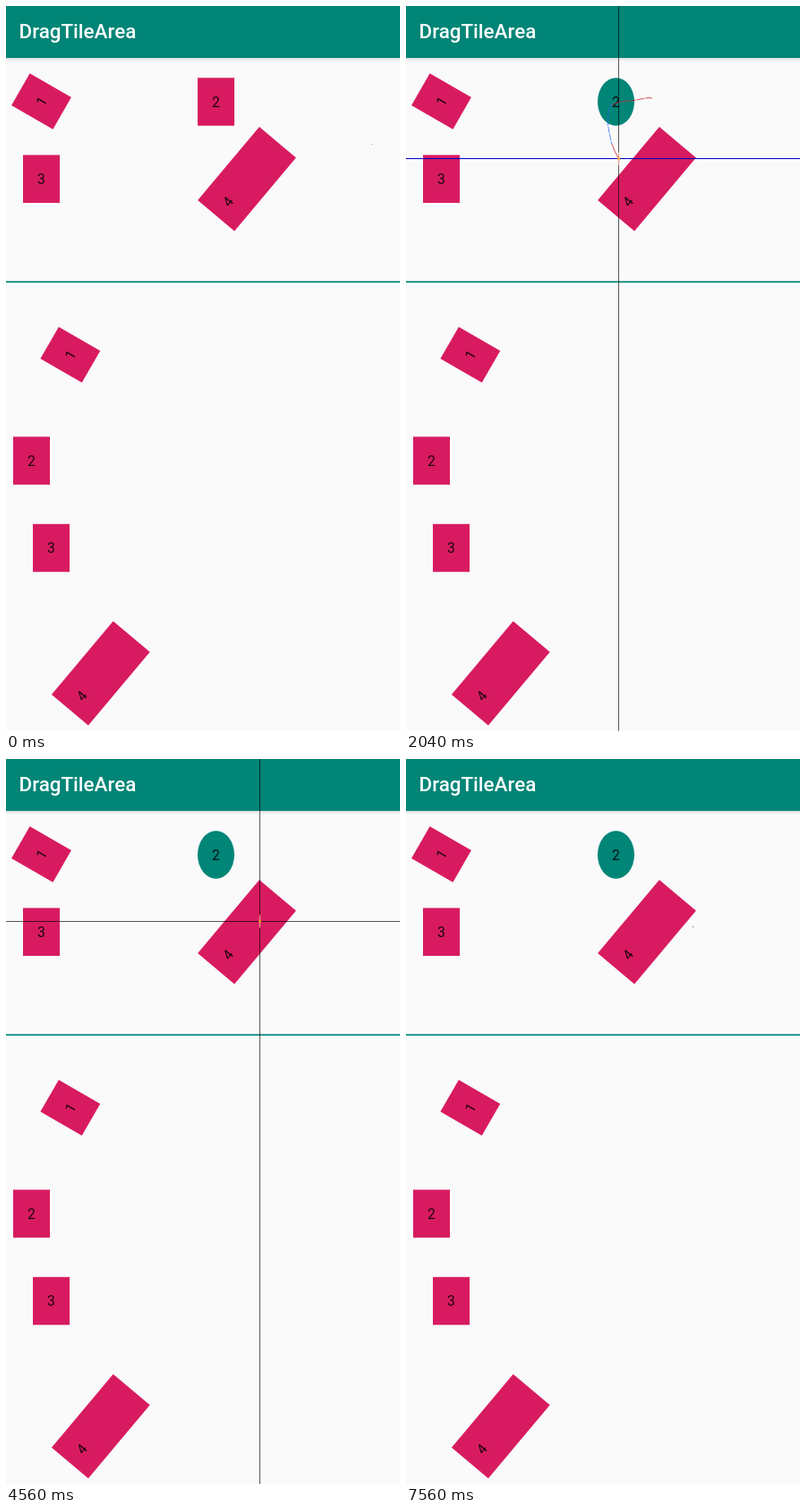
Recreate the animation shown at these times as an HTML page. Size 440 px wide and 810 px high, loop 8 s.

```html
<!DOCTYPE html>
<html lang="en">
<head>
<meta charset="utf-8">
<title>DragTileArea</title>
<style>
  html, body { margin: 0; width: 100%; height: 100%; overflow: hidden; background: #fafafa; }
  svg { display: block; width: 440px; height: 810px; }
  text { font-family: Roboto, sans-serif; }
  .title { font-size: 22.4px; font-weight: 500; fill: #fff; }
  .digit { font-size: 15.7px; text-anchor: middle; fill: rgba(0, 0, 0, .87); }
  .tile { fill: #d81b60; }
  .picked { fill: #008577; }
  .trail { fill: none; stroke-width: .8; }
</style>
</head>
<body>
<svg viewBox="0 0 440 810">
  <defs>
    <linearGradient id="shade" x2="0" y2="1">
      <stop stop-color="#000" stop-opacity=".12"/>
      <stop offset="1" stop-color="#000" stop-opacity="0"/>
    </linearGradient>
  </defs>
  <rect width="440" height="810" fill="#fafafa"/>
  <rect y="58" width="440" height="4" fill="url(#shade)"/>
  <rect width="440" height="58" fill="#008577"/>
  <text class="title" x="14.5" y="36">DragTileArea</text>
  <rect y="307.4" width="440" height="1.7" fill="#008577"/>
  <g id="tiles"></g>
  <g id="trails"></g>
  <g id="marks"></g>
  <g id="cross">
    <path id="across" d="M0 0H440"/>
    <path id="down" d="M0 0V810" stroke="#000" stroke-opacity=".65"/>
    <g id="touch">
      <ellipse rx=".8" ry="8" fill="#ffb0a0" fill-opacity=".8"/>
      <circle r="1.3" fill="#ffa000"/>
    </g>
  </g>
</svg>
<script>
const LOOP = 8000, STEP = 60, HEIGHT = 53.5;
const $ = id => document.getElementById(id);

function add(parent, tag, attrs) {
  const node = document.createElementNS("http://www.w3.org/2000/svg", tag);
  for (const key in attrs) node.setAttribute(key, attrs[key]);
  return parent.appendChild(node);
}
const show = (node, on) => node.setAttribute("visibility", on ? "visible" : "hidden");

// Labels sit one fixed inset from the left edge, before rotation.
function makeTile(label, x, y, angle = 0, width = 41) {
  const g = add($("tiles"), "g", { transform: `translate(${x} ${y}) rotate(${angle})` });
  const rect = add(g, "rect", { class: "tile", x: -width / 2, y: -HEIGHT / 2, width, height: HEIGHT });
  const oval = add(g, "ellipse", { class: "picked", rx: width / 2, ry: HEIGHT / 2 });
  add(g, "text", { class: "digit", x: 20.5 - width / 2, y: 5.6 }).textContent = label;
  const pick = on => { show(rect, !on); show(oval, on); };
  pick(false);
  return pick;
}

makeTile(1, 39.5, 106.5, -60);
const pickTwo = makeTile(2, 234.5, 107);
makeTile(3, 39.5, 193.2);
const pickFour = makeTile(4, 269, 193.2, -50, 107);
makeTile(1, 71.8, 389.7, -60);
makeTile(2, 28.5, 508);
makeTile(3, 50.5, 605.5);
makeTile(4, 105.8, 745.5, -50, 107);

const drag = { start: 1140, end: 2640, clear: 4560 };
const path = [
  [275, 103], [271, 102.5], [262, 104], [254, 105.5], [246, 106], [237, 107.5],
  [229.5, 110.5], [229.5, 110.5], [226.5, 117], [225.5, 123], [225.3, 130],
  [226.3, 138], [228, 146], [229.8, 154], [233.5, 163], [237.5, 170.5],
  [241, 175.5], [245, 181], [249, 185], [253, 189], [257, 191.5], [262, 194], [267.5, 196.5]
];
const taps = [
  { start: 4560, end: 4620, x: 283.5, y: 181.5 },
  { start: 5340, end: 5460, x: 233.5, y: 165.5 },
  { start: 6180, end: 6300, x: 246.5, y: 159.5 },
  { start: 6660, end: 6720, x: 291.5, y: 222.5, streak: 13 },
  { start: 7020, end: 7080, x: 308.5, y: 208.5 },
  { start: 7440, end: 7560, x: 320.5, y: 187.5 }
];

const segments = path.slice(1).map(([x, y], i) => add($("trails"), "path", {
  class: "trail",
  d: `M${path[i]}L${x} ${y}`,
  stroke: i > 6 && i < 13 ? "#2a6cf0" : "#d02030",
  "stroke-dasharray": i > 12 ? "none" : "4 1"
}));

const firstDot = add($("marks"), "rect", { x: 408, y: 154, width: 1, height: 1, fill: "#f08090" });
for (const tap of taps) {
  tap.mark = add($("marks"), "g", { transform: `translate(${tap.x} ${tap.y})` });
  if (tap.streak) {
    add(tap.mark, "path", { d: `M${-tap.streak / 2} 0h${tap.streak}`, stroke: "#e040a0", "stroke-width": .8 });
  }
  add(tap.mark, "rect", { x: -.5, y: -.5, width: 1, height: 1, fill: tap.streak ? "#c01060" : "#555" });
}

function setCross(point, blue) {
  show($("cross"), !!point);
  if (!point) return;
  const [x, y] = point;
  $("down").setAttribute("transform", `translate(${Math.floor(x) + .5} 0)`);
  $("across").setAttribute("transform", `translate(0 ${Math.floor(y) + .5})`);
  $("across").setAttribute("stroke", blue ? "#0000c0" : "rgba(0,0,0,.65)");
  $("touch").setAttribute("transform", `translate(${x} ${y})`);
}

function draw(t) {
  const index = Math.min(path.length - 1, Math.floor((t - drag.start) / STEP));
  const dragging = t >= drag.start && t < drag.end;
  const tap = taps.find(p => t >= p.start && t < p.end);
  const last = taps.filter(p => t >= p.end).pop();

  pickTwo(t >= 1320);
  pickFour(t >= 2160 && t < drag.clear);
  segments.forEach((s, i) => show(s, t < drag.clear && i < index));
  show(firstDot, t < drag.start);
  taps.forEach(p => show(p.mark, p === last && !tap));
  setCross(dragging ? path[index] : tap && [tap.x, tap.y], dragging);
}

const began = performance.now();
function tick() {
  draw((performance.now() - began) % LOOP);
  requestAnimationFrame(tick);
}
tick();
</script>
</body>
</html>
```
